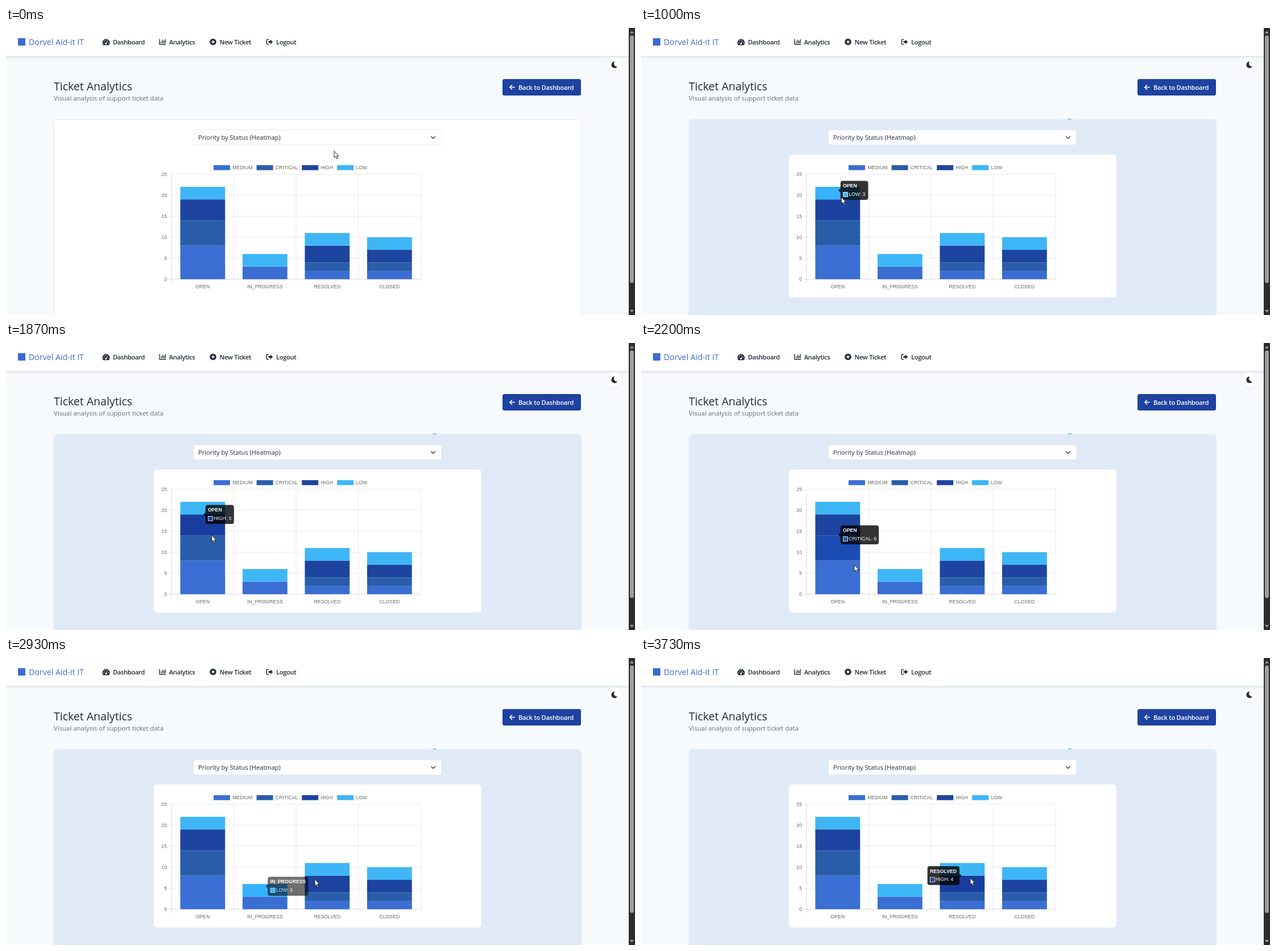
These frames come from a looping animation (1106x506 px, 4.14 s). An HTML page:

```html
<!DOCTYPE html>
<html lang="en">
<head>
<meta charset="utf-8">
<title>Ticket Analytics</title>
<style>
  html, body { margin: 0; width: 100%; height: 100%; overflow: hidden; background: #f6fafd; }
  svg { display: block; width: 100%; height: 100%; }
  text { font-family: "Open Sans", "Noto Sans", sans-serif; fill: #212b3a; white-space: pre; }
  .nav { font-size: 11.2px; font-weight: 600; letter-spacing: -.35px; }
  .chart text { font: 8.7px "Liberation Sans", Arial, sans-serif; fill: #666; }
  .chart .tip text { fill: #fff; }
  .chart .tip .head { font-weight: bold; }
</style>
</head>
<body>
<svg viewBox="0 0 1106 506" xmlns="http://www.w3.org/2000/svg">
  <defs>
    <linearGradient id="shade" x2="0" y2="1">
      <stop offset="0" stop-color="#1e3050" stop-opacity=".1"/>
      <stop offset="1" stop-color="#1e3050" stop-opacity="0"/>
    </linearGradient>
  </defs>
  <rect width="1106" height="506" fill="#f6fafd"/>

  <!-- header -->
  <rect y="49" width="1095" height="6" fill="url(#shade)"/>
  <rect width="1095" height="49" fill="#fff"/>
  <rect x="21" y="18" width="13" height="13" fill="#3a6bcf"/>
  <text x="40" y="29.8" font-size="14.2" font-weight="500" style="fill:#3a6bcf">Dorvel Aid-it IT</text>
  <g class="nav">
    <text x="188" y="28.7">Dashboard</text>
    <text x="286.8" y="28.7">Analytics</text>
    <text x="375.5" y="28.7">New Ticket</text>
    <text x="475" y="28.7">Logout</text>
  </g>
  <g fill="#212b3a">
    <path d="M171.2 30.2A6.5 6.5 0 1 1 180.8 30.2Z"/>
    <g fill="#fff">
      <circle cx="172" cy="26" r=".8"/><circle cx="173.2" cy="22.8" r=".8"/>
      <circle cx="176" cy="21.4" r=".8"/><circle cx="180" cy="26" r=".8"/>
    </g>
    <path d="M175.8 27.2L178.8 22.4" stroke="#fff" stroke-width="1"/>
    <circle cx="175.8" cy="27.4" r="1.5" fill="#fff"/>
    <path d="M270 19.5V28.8H281.2M273.2 23.5V26.8M275.6 20.8V26.8M278 22.6V26.8M280.3 19.8V26.8" fill="none" stroke="#212b3a" stroke-width="1.4"/>
    <circle cx="364" cy="24.5" r="5.8"/>
    <path d="M361 24.5H367M364 21.5V27.5" stroke="#fff" stroke-width="1.5"/>
    <path d="M461.8 20.2H459.6Q458.3 20.2 458.3 21.5V27.5Q458.3 28.8 459.6 28.8H461.8" fill="none" stroke="#212b3a" stroke-width="1.5"/>
    <path d="M461.5 23.1H464.7V20.2L469.2 24.5L464.7 28.8V25.9H461.5Z"/>
  </g>

  <!-- theme switch -->
  <circle cx="1069.8" cy="65" r="14" fill="#fff" stroke="#dfe5ec" stroke-width=".8"/>
  <path d="M1070.5 59.2A5.7 5.7 0 1 0 1075.2 67.6A5 5 0 0 1 1070.5 59.2Z" fill="#212b3a"/>

  <!-- heading -->
  <text x="84" y="109.8" font-size="19.5" font-weight="500">Ticket Analytics</text>
  <text x="84" y="128" font-size="11.4" style="fill:#656d77">Visual analysis of support ticket data</text>
  <rect x="873" y="90" width="138" height="29" rx="3.5" fill="#1e429f"/>
  <path d="M894.8 104.5H886.2M890 100.4L885.9 104.5L890 108.6" fill="none" stroke="#fff" stroke-width="1.6"/>
  <text class="nav" x="901" y="108.8" style="fill:#fff;letter-spacing:-.28px">Back to Dashboard</text>

  <!-- card -->
  <path id="spark" d="M750.3 161Q753.8 159.4 757.3 161" fill="none" stroke="#4a9fd8" stroke-width="1.1"/>
  <rect id="card" x="84.4" y="161.5" width="927" height="370" rx="6" stroke="#dde5ee" stroke-width=".8"/>
  <rect x="329.4" y="179.4" width="436.5" height="26.6" rx="4" fill="#fff" stroke="#dee3e9" stroke-width=".8"/>
  <text x="338" y="197" font-size="11.1">Priority by Status (Heatmap)</text>
  <path d="M747.4 190.9L751.2 194.7L755 190.9" fill="none" stroke="#343a40" stroke-width="1.4"/>
  <rect x="260" y="223" width="576" height="252" rx="6" fill="#fff"/>
  <g class="chart" id="chart"></g>

  <!-- scrollbar -->
  <rect x="1095" width="11" height="506" fill="#2b2c2d"/>
  <rect x="1097" y="13" width="7" height="436.5" rx="3.5" fill="#9d9e9f"/>
  <path d="M1097 9.5L1100.5 5L1104 9.5ZM1097 497L1100.5 501.5L1104 497Z" fill="#9d9e9f"/>

  <path id="pointer" d="M0 0V11.6L2.6 9.3L4.5 13.6L6.4 12.8L4.6 8.6H8Z" fill="#fff" stroke="#111" stroke-width=".9" stroke-linejoin="round"/>
</svg>
<script>
const LOOP = 4140, LAST = 3730;
const $ = id => document.getElementById(id);
const chart = $('chart');

function add(parent, tag, attrs, content) {
  const el = document.createElementNS('http://www.w3.org/2000/svg', tag);
  for (const k in attrs) el.setAttribute(k, attrs[k]);
  if (content !== undefined) el.textContent = content;
  return parent.appendChild(el);
}
function set(el, attrs) {
  for (const k in attrs) el.setAttribute(k, attrs[k]);
}

// Chart data, stacked from the bottom up
const series = [
  { name: 'MEDIUM', base: [58, 110, 210], hover: [48, 102, 212], key: 365 },
  { name: 'CRITICAL', base: [41, 93, 170], hover: [26, 76, 180], key: 440.6 },
  { name: 'HIGH', base: [29, 68, 159], hover: [24, 61, 159], key: 520.2 },
  { name: 'LOW', base: [62, 182, 245], hover: [53, 176, 255], key: 582.2 }
];
const columns = [
  { name: 'OPEN', values: [8, 6, 5, 3], head: 25 },
  { name: 'IN_PROGRESS', values: [3, 0, 0, 3], head: 62.5 },
  { name: 'RESOLVED', values: [2, 2, 4, 3], head: 47.6 },
  { name: 'CLOSED', values: [2, 2, 3, 3], head: 36 }
];
const bodyWidth = [44.7, 49, 31.3, 29.3];
const LEFT = 291.1, STEP = 109.5, BASE = 442.9, UNIT = 7.405, TIP_H = 33.4;
const yOf = v => BASE - v * UNIT;
const midOf = c => LEFT + STEP * (c + .5);
const rgb = c => `rgb(${c.map(Math.round)})`;
const mix = (a, b, p) => a + (b - a) * p;

for (let v = 0; v <= 25; v += 5) {
  add(chart, 'path', { d: `M286 ${yOf(v)}H729`, stroke: '#000', 'stroke-opacity': v ? .1 : .17, 'stroke-width': .9 });
  add(chart, 'text', { x: 283, y: yOf(v) + 2.8, 'text-anchor': 'end' }, v);
}
for (let i = 0; i < 5; i++) {
  add(chart, 'path', { d: `M${LEFT + STEP * i} 257.8V449`, stroke: '#000', 'stroke-opacity': i ? .1 : .17, 'stroke-width': .9 });
}
for (const s of series) {
  add(chart, 'rect', { x: s.key, y: 241.8, width: 29, height: 8.8, fill: rgb(s.base) });
  add(chart, 'text', { x: s.key + 33.2, y: 248.7 }, s.name);
}
const bars = columns.map((col, c) => {
  let sum = 0;
  add(chart, 'text', { x: midOf(c), y: 458.6, 'text-anchor': 'middle' }, col.name);
  return col.values.map((v, s) => {
    sum += v;
    return add(chart, 'rect', { x: midOf(c) - 39.4, y: yOf(sum), width: 78.8, height: v * UNIT, fill: rgb(series[s].base) });
  });
});

// Tooltip
const tip = add(chart, 'g', { class: 'tip' });
const tipBox = add(tip, 'path', { fill: '#000', 'fill-opacity': .8 });
const tipHead = add(tip, 'text', { class: 'head', y: 11.7 });
const tipKey = add(tip, 'rect', { y: 19.9, width: 8, height: 8, stroke: '#fff', 'stroke-width': .8 });
const tipBody = add(tip, 'text', { y: 26.4 });

// Hover changes: time, column, series; no column hides the tooltip
const hovers = [
  [613, 0, 2], [890, 0, 3], [1406, 0, 2], [1960, 0, 1], [2414, 0, 0],
  [2449, 1, 0], [2454], [2790, 1, 3], [3060, 2, 2]
];
// Pointer path: time, x, y
const path = [
  [0, 577, 217], [70, 568, 223], [270, 470, 283], [530, 391, 310], [600, 377, 310],
  [670, 367, 308], [890, 356, 300], [1070, 350, 297], [1200, 340, 295], [1400, 348, 304],
  [1470, 354, 311], [1600, 357, 318], [1900, 362, 341], [2130, 369, 373], [2200, 375, 391],
  [2330, 396, 413], [2530, 435, 423], [2670, 426, 425], [2730, 419, 428], [2800, 452, 419],
  [2930, 543, 390], [3200, 570, 388], [3500, 577, 387], [3730, 579, 388]
];

function place(c, s) {
  const top = columns[c].values.slice(0, s + 1).reduce((a, b) => a + b, 0);
  const w = Math.max(columns[c].head + 8.7, bodyWidth[s] + 18.8);
  return { x: c < 2 ? midOf(c) + 4.9 : midOf(c) - 4.9 - w, y: yOf(top), w };
}
const outQuart = p => 1 - (1 - Math.min(1, p)) ** 4;

function tipAt(t) {
  let from = place(0, 1), to = from, start = -1e4;
  let fade = [0, 0, -1e4], col = 0, ser = 1;
  const box = now => {
    const p = outQuart((now - start) / 400);
    return { x: mix(from.x, to.x, p), y: mix(from.y, to.y, p), w: mix(from.w, to.w, p) };
  };
  const alpha = now => mix(fade[0], fade[1], Math.min(1, (now - fade[2]) / 200));
  for (const [time, c, s] of hovers) {
    if (time > t) break;
    const goal = c === undefined ? 0 : 1;
    if (goal !== fade[1]) fade = [alpha(time), goal, time];
    if (!goal) continue;
    from = box(time);
    to = place(c, s);
    start = time;
    col = c;
    ser = s;
  }
  return { ...box(t), alpha: alpha(t), col, ser };
}

function drawTip(t) {
  const { x, y, w, alpha, col, ser } = tipAt(t);
  const r = 4.2, h = TIP_H, m = h / 2, side = col < 2;
  const rightCaret = side ? '' : `V${m - 3.6}L${w + 3.7} ${m}L${w} ${m + 3.6}`;
  const leftCaret = side ? `V${m + 3.6}L-3.7 ${m}L0 ${m - 3.6}` : '';
  set(tip, { transform: `translate(${x} ${y - m})`, opacity: alpha });
  set(tipBox, {
    d: `M${r} 0H${w - r}Q${w} 0 ${w} ${r}${rightCaret}V${h - r}Q${w} ${h} ${w - r} ${h}` +
       `H${r}Q0 ${h} 0 ${h - r}${leftCaret}V${r}Q0 0 ${r} 0Z`
  });
  tipHead.textContent = columns[col].name;
  tipBody.textContent = `${series[ser].name}: ${columns[col].values[ser]}`;
  set(tipHead, { x: 4.3 });
  set(tipKey, { x: 4.8, fill: rgb(series[ser].base) });
  set(tipBody, { x: 14.4 });
}

function drawBars(t) {
  bars.forEach((stack, c) => stack.forEach((bar, s) => {
    let from = 0, to = 0, start = -1e4;
    for (const [time, hc, hs] of hovers) {
      if (time > t) break;
      const goal = hc === c && hs === s ? 1 : 0;
      if (goal === to) continue;
      from = mix(from, to, outQuart((time - start) / 400));
      to = goal;
      start = time;
    }
    const p = mix(from, to, outQuart((t - start) / 400));
    set(bar, { fill: rgb(series[s].base.map((v, i) => mix(v, series[s].hover[i], p))) });
  }));
}

function drawPointer(t) {
  let i = 0;
  while (i < path.length - 2 && path[i + 1][0] <= t) i++;
  const [t0, x0, y0] = path[i], [t1, x1, y1] = path[i + 1];
  const p = Math.min(1, (t - t0) / (t1 - t0));
  set($('pointer'), { transform: `translate(${mix(x0, x1, p)} ${mix(y0, y1, p)})` });
}

// The screen refreshes 15 times a second, on whole hundredths
function tick(t) {
  const at = k => Math.round(k * 20 / 3) * 10;
  let k = Math.round(t * .015) + 1;
  while (at(k) > t) k--;
  return Math.min(at(k), LAST);
}

function render(ms) {
  const t = tick(ms % LOOP);
  set($('card'), { fill: t < 70 ? '#fff' : '#e0eaf7' });
  set($('spark'), { opacity: t < 130 ? 0 : 1 });
  drawBars(t);
  drawTip(t);
  drawPointer(t);
}

const begin = performance.now();
function loop() {
  render(performance.now() - begin);
  requestAnimationFrame(loop);
}
loop();
</script>
</body>
</html>
```
